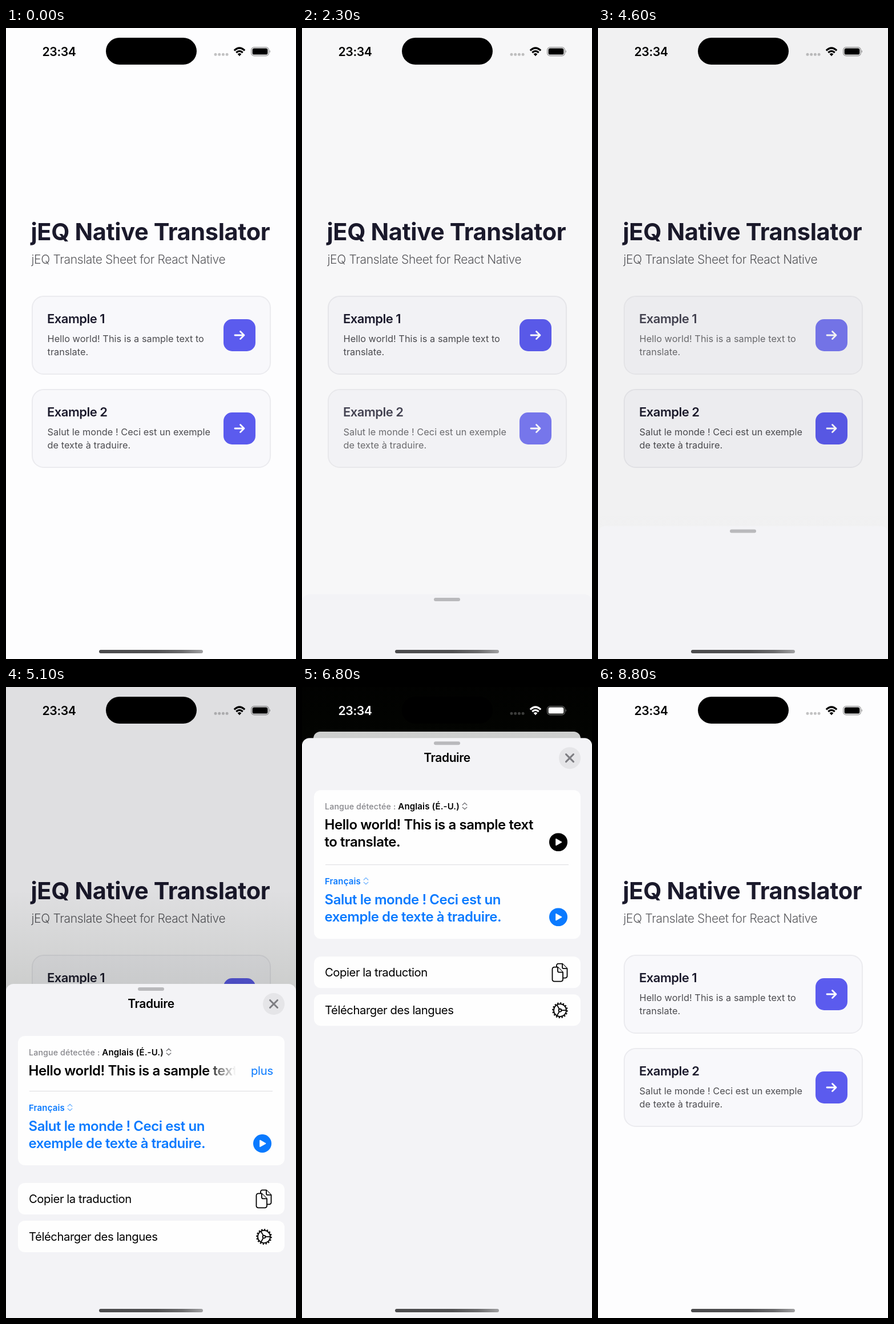
Write an HTML page that moves like this. It is 508x1103 px and loops after 8900 ms.

```html
<!DOCTYPE html>
<html lang="fr">
<head>
<meta charset="utf-8">
<title>Translate sheet</title>
<style>
  html, body { margin: 0; width: 100%; height: 100%; overflow: hidden; background: #000; }
  body { font-family: Inter, "Open Sans", sans-serif; font-optical-sizing: none; color: #000; }
  #stage, #stage div, #stage > svg, .icon { position: absolute; }
  #stage { width: 508px; height: 1103px; overflow: hidden; }
  .fill { inset: 0; }
  .line { white-space: nowrap; line-height: 30px; }

  #page { inset: 0; background: #fdfdfe; overflow: hidden; transform-origin: 50% 0; }
  #dim { inset: 0; background: #00000f; }
  h1, h2, p { position: absolute; margin: 0; white-space: nowrap; }
  h1 { left: 43.5px; top: 331px; font: 700 41.5px/50px Inter, sans-serif; letter-spacing: -.38px; color: #1b1a2c; }
  .sub { left: 44.5px; top: 390px; font-size: 21px; font-weight: 300; line-height: 30px; letter-spacing: -.34px; color: #5a5a5e; }
  .card {
    left: 45px; width: 419px; height: 138px; box-sizing: border-box;
    background: #f8f8fb; border: 2px solid #ebebef; border-radius: 21px;
  }
  .card h2 { left: 25px; top: 23px; font: 600 22px/30px Inter, sans-serif; letter-spacing: -.5px; color: #1b1a2c; }
  .card p { left: 25.5px; top: 62px; font-size: 16.3px; line-height: 23.5px; letter-spacing: .05px; color: #4c4c50; }
  .go { left: 333.5px; top: 39.5px; width: 56px; height: 55.5px; border-radius: 15px; background: #5b5bee; }

  #sheet { left: 0; top: 0; width: 508px; height: 1103px; }
  #shade { left: 0; right: 0; top: -165px; height: 179px;
    background: linear-gradient(rgba(28,40,14,0), rgba(28,40,14,.035) 35%, rgba(28,40,14,.1)); }
  #panel { inset: 0; background: #f3f3f6; border-radius: 13px 13px 0 0; }
  .grab { left: 231px; top: 6px; width: 46px; height: 6px; border-radius: 3px; background: #b9b9bc; }
  .head { left: 0; right: 0; top: 20px; text-align: center; font-size: 21px; font-weight: 600; letter-spacing: -.42px; }
  .close { left: 449.5px; top: 16px; width: 38px; height: 38px; border-radius: 50%; background: #e5e5e8; }
  .box { left: 20.5px; width: 467px; background: #fefefe; border-radius: 12px; }
  #main { top: 91px; }
  .row { height: 55px; }
  .label { left: 40px; font-size: 15px; font-weight: 600; letter-spacing: .15px; }
  .label i { font-style: normal; font-weight: 500; font-size: 14.2px; color: #86868b; }
  .label svg { margin-left: 4px; vertical-align: -1px; }
  .text { left: 39.5px; font-size: 24px; font-weight: 600; letter-spacing: -.44px; line-height: 30px; white-space: pre; }
  #brief { width: 363px; overflow: hidden;
    -webkit-mask: linear-gradient(90deg, #000 310px, transparent 363px);
    mask: linear-gradient(90deg, #000 310px, transparent 363px); }
  .blue { color: #0a7aff; }
  .more { left: 429px; top: 137px; font-size: 20.3px; letter-spacing: -.3px; }
  .rule { left: 41px; width: 426px; top: 187px; height: 1px; background: #dcdcdf; }
  .action { left: 40px; font-size: 20.3px; letter-spacing: -.45px; }

  .island { left: 174.5px; top: 17px; width: 159px; height: 47px; border-radius: 24px; background: #000; }
  .clock { left: 63.5px; top: 26px; font-size: 21.2px; font-weight: 600; letter-spacing: -.4px; }
  .home { left: 163px; top: 1087px; width: 182px; height: 6px; border-radius: 3px;
    background: linear-gradient(90deg, #4b4b4d, #515153 55%, #6b6b6d 80%, #a0a0a2); }
</style>
</head>
<body>
<svg width="0" height="0" style="position:absolute" fill="none">
  <symbol id="arrow" viewBox="0 0 56 56">
    <path d="M20 28H36M29.5 21.5L36 28L29.5 34.5" fill="none" stroke="#fff" stroke-width="2.8" stroke-linecap="round" stroke-linejoin="round"/>
  </symbol>
  <symbol id="updown" viewBox="0 0 10 14">
    <path d="M1.2 5L5 1.4L8.8 5M1.2 9L5 12.6L8.8 9" fill="none" stroke="currentColor" stroke-width="1.4" stroke-linecap="round" stroke-linejoin="round"/>
  </symbol>
  <symbol id="play" viewBox="0 0 32 32">
    <circle cx="16" cy="16" r="16" fill="currentColor"/>
    <path d="M12 10.6V21.4L21.6 16Z" fill="#fff" stroke="#fff" stroke-width="1.6" stroke-linejoin="round"/>
  </symbol>
  <symbol id="copy" viewBox="0 0 30 34">
    <g fill="#fefefe" stroke="#000" stroke-width="1.8" stroke-linejoin="round">
      <path d="M12 1.5H19L27.5 10V23A3.5 3.5 0 0 1 24 26.5H12A3 3 0 0 1 9 23.5V4.5A3 3 0 0 1 12 1.5Z"/>
      <path d="M19 1.5V7.5Q19 10 21.5 10H27.5"/>
      <path d="M5 7.5H11L20 16.5V29A3.5 3.5 0 0 1 16.5 32.5H5A3.5 3.5 0 0 1 1.5 29V11A3.5 3.5 0 0 1 5 7.5Z"/>
      <path d="M11 7.5V14Q11 16.5 13.5 16.5H20"/>
    </g>
  </symbol>
  <symbol id="gear" viewBox="-15 -15 30 30">
    <g fill="none" stroke="#000" stroke-width="1.8">
      <circle r="11"/>
      <circle r="12.8" stroke-width="2" pathLength="72" stroke-dasharray="2.2 2.3"/>
      <circle r="2.4"/>
      <path d="M2.4 0H11M-1.2 -2.1L-5.5 -9.5M-1.2 2.1L-5.5 9.5"/>
    </g>
  </symbol>
</svg>

<div id="stage">
  <div id="page">
    <h1>jEQ Native Translator</h1>
    <p class="sub">jEQ Translate Sheet for React Native</p>
    <div class="card" style="top:467.5px">
      <h2>Example 1</h2>
      <p>Hello world! This is a sample text to<br>translate.</p>
      <div class="go"><svg width="56" height="56"><use href="#arrow"/></svg></div>
    </div>
    <div class="card" style="top:630.5px">
      <h2>Example 2</h2>
      <p>Salut le monde ! Ceci est un exemple<br>de texte à traduire.</p>
      <div class="go"><svg width="56" height="56"><use href="#arrow"/></svg></div>
    </div>
    <div id="dim"></div>
  </div>

  <div id="sheet">
    <div id="shade"></div>
    <div id="panel">
      <div class="grab"></div>
      <div id="content" class="fill">
        <div class="head line">Traduire</div>
        <div class="close">
          <svg width="38" height="38"><path d="M12.5 12.5L25.5 25.5M25.5 12.5L12.5 25.5" stroke="#7d7d82" stroke-width="3" stroke-linecap="round"/></svg>
        </div>
        <div class="box" id="main"></div>
        <div class="label line" style="top:105px"><i>Langue détectée :</i> <span id="from"></span><svg width="10" height="14" color="#77777b"><use href="#updown"/></svg></div>
        <div id="short" class="fill">
          <div class="text" id="brief" style="top:137px"></div>
          <div class="more line blue">plus</div>
        </div>
        <div id="full" class="fill">
          <div class="text" id="source" style="top:137px"></div>
          <svg class="icon" style="left:433px;top:166px" width="32" height="32"><use href="#play"/></svg>
        </div>
        <div id="lower" class="fill">
          <div class="rule"></div>
          <div class="label line blue" style="top:202px"><span id="to"></span><svg width="10" height="14" color="#7ab8ff"><use href="#updown"/></svg></div>
          <div class="text blue" id="result" style="top:234px"></div>
          <svg class="icon blue" style="left:433px;top:263px" width="32" height="32"><use href="#play"/></svg>
          <div class="box row" style="top:348px"></div>
          <div class="action line" style="top:361px">Copier la traduction</div>
          <svg class="icon" style="left:436.5px;top:358.5px" width="30" height="34"><use href="#copy"/></svg>
          <div class="box row" style="top:413.5px"></div>
          <div class="action line" style="top:426.5px">Télécharger des langues</div>
          <svg class="icon" style="left:436.5px;top:426.5px" width="30" height="30"><use href="#gear"/></svg>
        </div>
      </div>
    </div>
  </div>

  <div class="island"></div>
  <div id="status" class="fill">
    <div class="clock line">23:34</div>
    <svg class="icon" style="left:0;top:0" width="508" height="80" fill="none" stroke="currentColor">
      <path d="M367 46.3H388" stroke-width="5" stroke-linecap="round" stroke-dasharray="0 6.7" opacity=".23"/>
      <path d="M399.8 39.4Q409 30.6 418.2 39.4M403.3 43Q409 37.6 414.7 43" stroke-width="3.1"/>
      <path d="M405.6 45.6Q409 42.6 412.4 45.6L409 49.2Z" fill="currentColor" stroke="none"/>
      <rect x="429.6" y="33.6" width="30.8" height="15" rx="5" stroke-width="1.2" opacity=".42"/>
      <rect x="431.6" y="35.6" width="26.8" height="11" rx="3.2" fill="currentColor" stroke="none"/>
      <path d="M461.8 38.6Q464 41 461.8 43.6Z" fill="currentColor" stroke="none" opacity=".5"/>
    </svg>
  </div>
  <div class="home"></div>
</div>

<script>
  const LOOP = 8900, STEP = 100;
  const HIDDEN = 1125, MEDIUM = 517, LARGE = 89;

  // Moves: [start ms, target, stiffness], each eased by a critically damped spring.
  const SHEET = [
    [590, MEDIUM, 13], [1550, HIDDEN, 14],
    [2232, MEDIUM, 13], [3750, HIDDEN, 14],
    [4490, MEDIUM, 13], [6005, LARGE, 13],
    [7220, 523, 19], [7700, MEDIUM, 13], [8220, HIDDEN, 17]
  ];
  const EXPAND = [[6000, 1, 1000], [7700, 0, 16]];
  const OPENS = [[590, 0], [2232, 1], [4490, 0]];
  const TAPS = [[600, 4500], [2200]];

  const english = "Anglais (É.-U.)", french = "Français";
  const hello = "Salut le monde ! Ceci est un\nexemple de texte à traduire.";
  const DOCS = [
    { from: english, to: french, source: "Hello world! This is a sample text\nto translate.", result: hello },
    { from: french, to: english, source: hello, result: "Hello world! This is an example of\ntext to translate." }
  ];

  const $ = id => document.getElementById(id);
  const cards = document.querySelectorAll(".card");
  const clamp = x => Math.min(1, Math.max(0, x));

  function spring(ms, w) {
    const a = Math.max(0, ms) / 1000 * w;
    return 1 - (1 + a) * Math.exp(-a);
  }

  function track(moves, value, t) {
    let from = value;
    for (const [start, target, w] of moves) {
      value += (target - from) * spring(t - start, w);
      from = target;
    }
    return value;
  }

  // Pressed cards dim at once and recover over 250 ms.
  function pressed(taps, t) {
    const on = taps.some(s => t >= s && t < s + 250);
    const back = Math.max(0, ...taps.map(s => t >= s + 250 ? 1 - (t - s - 250) / 250 : 0));
    return on ? 1 : back;
  }

  let shown = -1;
  function setDoc(i) {
    if (i === shown) return;
    shown = i;
    const doc = DOCS[i];
    for (const key in doc) $(key).textContent = doc[key];
    $("brief").textContent = doc.source.replace("\n", " ");
  }

  function draw(t) {
    const top = track(SHEET, HIDDEN, t);
    const rise = clamp((1103 - top) / (1103 - MEDIUM));
    const grow = clamp((MEDIUM - top) / (MEDIUM - LARGE));
    const open = OPENS.filter(o => o[0] <= t).pop() || OPENS[0];
    setDoc(open[1]);

    $("sheet").style.transform = `translateY(${top}px)`;
    $("shade").style.opacity = rise ** 4;
    $("dim").style.opacity = .118 * rise;
    $("content").style.opacity = clamp((t - open[0] - 200) / 150);

    const page = $("page").style;
    page.transform = `translateY(${78 * grow}px) scale(${1 - 40 / 508 * grow})`;
    page.borderRadius = t >= 6000 && t < 7800 ? `${78 - 65 * grow}px` : "0";
    $("status").style.color = grow > .6 ? "#fff" : "#000";

    const wide = track(EXPAND, 0, t);
    $("main").style.height = `${226 + 34 * wide}px`;
    $("lower").style.transform = `translateY(${34 * wide}px)`;
    $("full").style.opacity = wide;
    $("short").style.opacity = 1 - wide;

    cards.forEach((card, i) => card.style.opacity = 1 - .19 * pressed(TAPS[i], t));
  }

  const begin = performance.now();
  function tick() {
    const t = (performance.now() - begin) % LOOP;
    draw(Math.floor(t / STEP) * STEP);
    requestAnimationFrame(tick);
  }
  tick();
</script>
</body>
</html>
```
